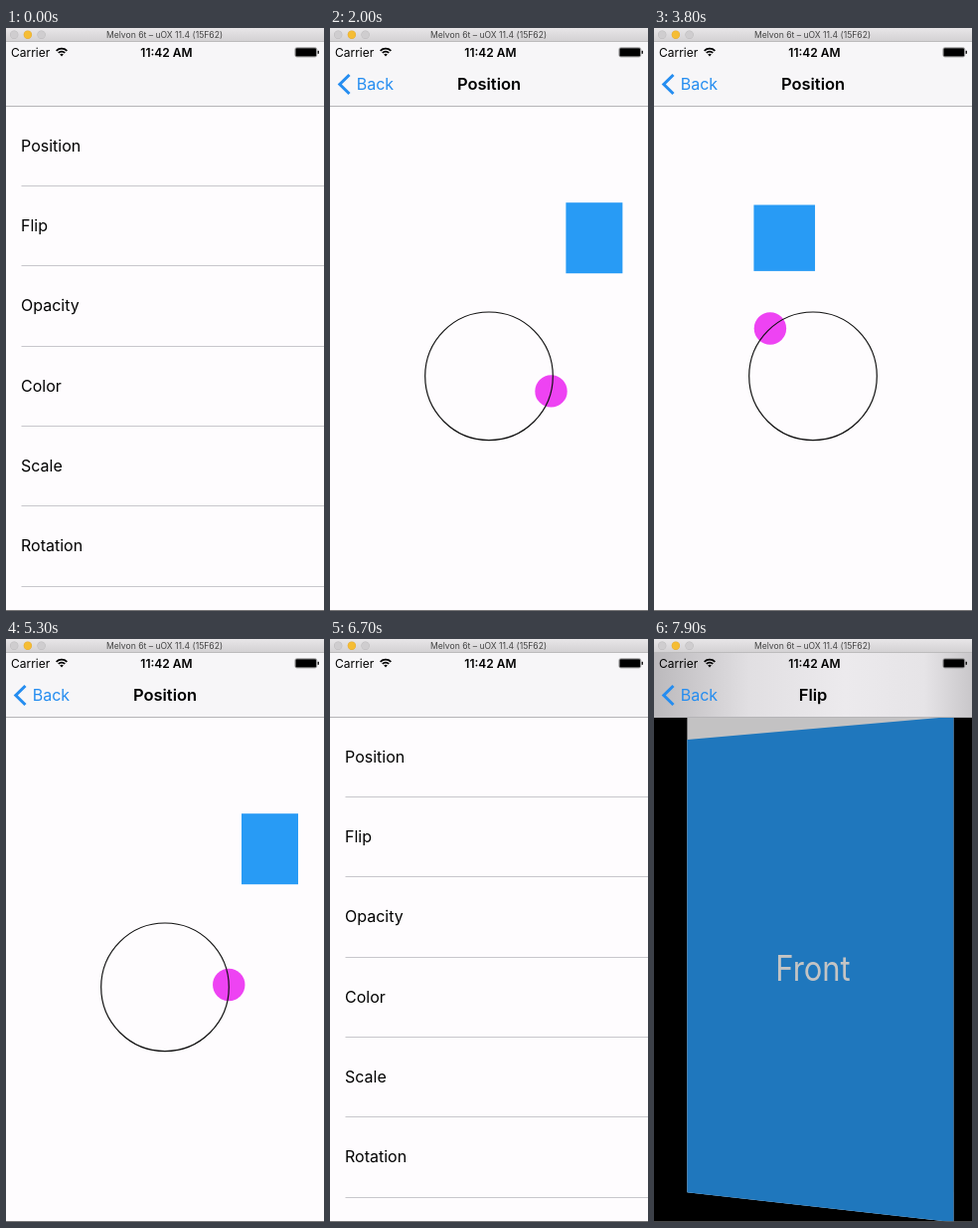
Recreate the animation shown at these times as an HTML page with a canvas. Size 320 by 585 pixels, loop 8000 ms.

```html
<!DOCTYPE html>
<html lang="en">
<head>
<meta charset="utf-8">
<title>Animation list</title>
<style>
html, body { margin: 0; width: 100%; height: 100%; overflow: hidden; background: #fff; }
canvas { display: block; width: 320px; height: 585px; }
</style>
</head>
<body>
<canvas id="stage"></canvas>
<script>
const W = 320, H = 585, TOP = 14, BAR = 78, LOOP = 8000, STEP = 100;
const BLUE = '#289bf5', TINT = '#258df0', PAPER = '#fefcfe', LINE = '#c8c7cc';
const FONT = 'Inter, "Liberation Sans", sans-serif';
const ROWS = ['Position', 'Flip', 'Opacity', 'Color', 'Scale', 'Rotation'];
const ROW_H = 80.3, TILT = 0.489;

const canvas = document.getElementById('stage');
const ratio = window.devicePixelRatio || 1;
canvas.width = W * ratio;
canvas.height = H * ratio;
const ctx = canvas.getContext('2d');

const clamp = v => Math.max(0, Math.min(1, v));
const mix = (a, b, k) => a + (b - a) * k;

function rect(x, y, w, h, color) {
  ctx.fillStyle = color;
  ctx.fillRect(x, y, w, h);
}

function disc(x, y, r, color) {
  ctx.fillStyle = color;
  ctx.beginPath();
  ctx.arc(x, y, r, 0, Math.PI * 2);
  ctx.fill();
}

function poly(points, color) {
  ctx.fillStyle = color;
  ctx.beginPath();
  points.forEach(p => ctx.lineTo(p[0], p[1]));
  ctx.fill();
}

function text(str, x, y, size, weight, color, align = 'left') {
  ctx.font = `${weight} ${size}px ${FONT}`;
  ctx.textAlign = align;
  ctx.fillStyle = color;
  ctx.fillText(str, x, y);
}

function withAlpha(a, draw) {
  ctx.save();
  ctx.globalAlpha = clamp(a);
  draw();
  ctx.restore();
}

// Critically damped spring used by screen transitions
function settle(ms) {
  const u = Math.max(0, ms) * 0.01826;
  return 1 - (1 + u) * Math.exp(-u);
}

// Slightly bouncy spring used by the box
function bounce(ms) {
  if (ms <= 0) return 0;
  const z = 0.82, w = 11.25, s = ms / 1000, k = Math.sqrt(1 - z * z), a = w * k * s;
  return 1 - Math.exp(-z * w * s) * (Math.cos(a) + z / k * Math.sin(a));
}

// Bezier ease (.42, 0, .58, 1)
function easeInOut(x) {
  x = clamp(x);
  let lo = 0, hi = 1;
  for (let i = 0; i < 24; i++) {
    const s = (lo + hi) / 2;
    if (1.26 * s - 0.78 * s * s + 0.52 * s * s * s < x) lo = s; else hi = s;
  }
  return lo * lo * (3 - 2 * lo);
}

function list(shift, picked, glow) {
  ctx.save();
  ctx.translate(-shift * 96, 0);
  rect(0, BAR, W + 96, H - BAR, PAPER);
  ROWS.forEach((name, i) => {
    const y = BAR - 0.2 + i * ROW_H;
    const end = Math.round(y + ROW_H);
    rect(15.5, end, W + 96, 1, LINE);
    if (i === picked) {
      withAlpha(glow, () => rect(0, Math.round(y), W + 96, end + 1 - Math.round(y), '#d9d8da'));
    }
    text(name, 15, y + 46, 16, 400, '#000');
  });
  ctx.restore();
  if (shift > 0) rect(0, BAR, W, H - BAR, `rgba(0,0,0,${0.1 * shift})`);
}

function positionPage(t, x) {
  ctx.save();
  ctx.translate(x, 0);
  rect(0, BAR, W, H - BAR, PAPER);

  const k = bounce(t < 3700 ? t - 1600 : t - 3700);
  const w = mix(64, 57, k), h = mix(64, 71, k);
  rect(mix(30, 237, k), 210.7 - h / 2, w, h, BLUE);

  const a = easeInOut((t - 1440) / 4080) * Math.PI * 2;
  disc(160 + 64.3 * Math.cos(a), 349.3 + 64.3 * Math.sin(a), 16.2, '#ee43f3');
  ctx.strokeStyle = '#111';
  ctx.lineWidth = 1.2;
  ctx.beginPath();
  ctx.arc(160, 349.3, 64.3, 0, Math.PI * 2);
  ctx.stroke();
  ctx.restore();
}

function flipPage(x, angle) {
  const sin = Math.sin(angle), cos = Math.cos(angle);
  const cx = W / 2, cy = 299.5, eye = 1285;
  const scaleAt = px => eye / (eye + 158 * sin - (px - cx) * sin);
  const project = (px, py) => {
    const s = scaleAt(px);
    return [x + cx + (px - cx) * cos * s, cy + (py - cy) * s];
  };
  const quad = y => [project(0, y), project(W, y), project(W, H), project(0, H)];

  if (angle > 0) rect(0, TOP, W, H - TOP, '#000');
  poly(quad(TOP), PAPER);
  poly(quad(BAR), BLUE);
  ctx.save();
  const s = scaleAt(cx);
  ctx.translate(...project(cx, 331.5));
  ctx.scale(cos * s, s);
  text('Front', 0, 13.8, 37, 400, '#fff', 'center');
  ctx.restore();
  if (angle > 0) poly(quad(TOP), `rgba(0,0,0,${0.49 * sin})`);
}

function navBar(title, p, shade) {
  rect(0, TOP, W, BAR - TOP, '#f7f6f8');
  if (shade > 0) {
    const g = ctx.createLinearGradient(0, 0, W, 0);
    g.addColorStop(0, '#bbb9bc');
    g.addColorStop(0.3, '#e1dfe2');
    g.addColorStop(0.6, '#eceaed');
    g.addColorStop(0.85, '#e6e4e7');
    g.addColorStop(1, '#c9c7ca');
    withAlpha(shade, () => rect(0, TOP, W, BAR - TOP, g));
  }
  rect(0, BAR, W, 1, '#b5b4b7');
  if (p <= 0) return;

  withAlpha(p * 1.03, () =>
    text(title, 160 + 185 * (1 - p), 62.2, 16.5, 600, '#000', 'center'));
  withAlpha((p - 0.9) * 10, () => {
    text('Back', 26.7 + 110 * (1 - p), 62, 16, 400, TINT);
    ctx.strokeStyle = TINT;
    ctx.lineWidth = 3;
    ctx.beginPath();
    ctx.moveTo(19.5, 47);
    ctx.lineTo(9.8, 56.5);
    ctx.lineTo(19.5, 66);
    ctx.stroke();
  });
}

function statusBar() {
  text('Carrier', 5, 28.6, 12, 400, '#000');
  text('11:42 AM', 161.5, 28.6, 12, 600, '#000', 'center');

  ctx.strokeStyle = '#000';
  ctx.lineWidth = 1.7;
  [4.6, 7.6].forEach(r => {
    ctx.beginPath();
    ctx.arc(56, 28.2, r, -Math.PI * 0.75, -Math.PI * 0.25);
    ctx.stroke();
  });
  ctx.fillStyle = '#000';
  ctx.beginPath();
  ctx.moveTo(56, 28.4);
  ctx.arc(56, 28.4, 2.6, -Math.PI * 0.75, -Math.PI * 0.25);
  ctx.fill();

  ctx.strokeStyle = '#777';
  ctx.lineWidth = 0.6;
  ctx.beginPath();
  ctx.roundRect(290.8, 19.6, 22, 9.4, 2);
  ctx.stroke();
  ctx.beginPath();
  ctx.roundRect(291.4, 20.2, 20.8, 8.2, 1.2);
  ctx.fill();
  rect(313.6, 22.8, 1.3, 3, '#000');
}

function titleBar() {
  const g = ctx.createLinearGradient(0, 0, 0, TOP);
  g.addColorStop(0, '#e8e6e8');
  g.addColorStop(1, '#d2d0d2');
  rect(0, 0, W, TOP, g);
  rect(0, TOP - 0.7, W, 0.7, '#b4b2b4');
  ['#cfcdcf', '#f5bd34', '#cfcdcf'].forEach((color, i) => {
    const x = 8.2 + i * 13.7;
    disc(x, 6.8, 4.2, i === 1 ? '#e0a83a' : '#bbb9bb');
    disc(x, 6.8, 3.7, color);
  });
  text('Melvon 6t – uOX 11.4 (15F62)', 159.5, 10.2, 8.6, 400, '#444', 'center');
}

function draw(t) {
  ctx.setTransform(ratio, 0, 0, ratio, 0, 0);
  rect(0, 0, W, H, PAPER);

  const first = t < 6500;
  const popped = settle(t - 5450);
  const p = first ? settle(t - 1070) * (1 - popped) : settle(t - 6974);
  const glow = first ? (t >= 1000 ? 1 - clamp((t - 5450) / 500) : 0) : (t >= 6900 ? 1 : 0);
  const q = p > 0.998 ? 1 : p < 0.002 ? 0 : p;
  const angle = t > 7640 ? TILT * Math.pow((t - 7640) / 260, 1.7) : 0;
  const x = W * (1 - q);

  if (q < 1) list(q, first ? 0 : 1, glow);
  if (q > 0) {
    if (first) positionPage(t, x);
    else flipPage(x, angle);
  }
  navBar(first ? 'Position' : 'Flip', q, Math.sin(angle) / Math.sin(TILT));
  statusBar();
  titleBar();
  rect(0, H - 0.8, W, 0.8, '#555');
}

const start = performance.now();
function tick() {
  const t = (performance.now() - start) % LOOP;
  draw(Math.floor(t / STEP) * STEP);
  requestAnimationFrame(tick);
}
tick();
</script>
</body>
</html>
```
